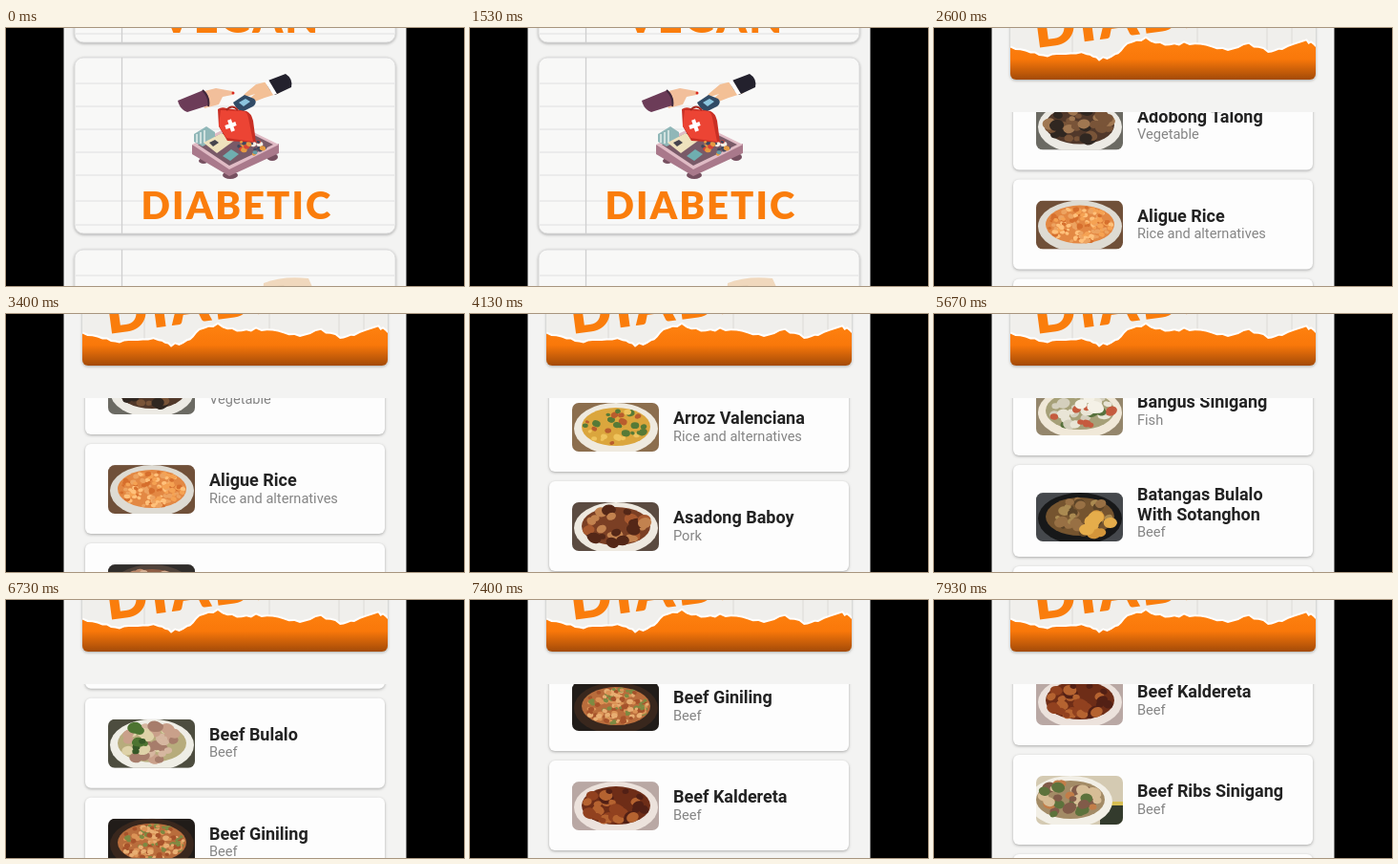
These frames come from a looping animation (480x270 px, 8 s). An HTML page:

```html
<!DOCTYPE html>
<html lang="en">
<head>
<meta charset="utf-8">
<title>Recipe app</title>
<style>
  html, body { margin: 0; width: 100%; height: 100%; overflow: hidden; background: #000; }
  svg { display: block; width: 100vw; height: 100vh; }
  .caps { font: 900 40px Lato, sans-serif; fill: #fa7d0c; letter-spacing: 2.1px; text-anchor: middle; }
  .title { font: 700 18px Roboto, sans-serif; fill: #222; }
  .kind { font: 400 14.6px Roboto, sans-serif; fill: #858585; }
  .card { filter: drop-shadow(0 1.5px 1.5px rgba(0, 0, 0, .3)); }
  #home { animation: home 8s step-end infinite; }
  #recipes { animation: recipes 8s step-end infinite; }
  #categories { animation: browse 8s infinite; }
  #list { animation: swipe 8s cubic-bezier(.35, 0, .3, 1) infinite; }

  @keyframes home { 0% { visibility: visible } 21.625%, 100% { visibility: hidden } }
  @keyframes recipes { 0% { visibility: hidden } 21.625%, 100% { visibility: visible } }
  @keyframes browse {
    0%, 5% { transform: translateY(0); animation-timing-function: ease-in-out }
    9.5% { transform: translateY(-45px); animation-timing-function: ease-in-out }
    15%, 100% { transform: translateY(0) }
  }
  @keyframes swipe {
    0%, 28.375% { transform: translateY(98px) }
    34.125%, 35.875% { transform: translateY(-60px) }
    37.5%, 41.625% { transform: translateY(-65px) }
    51.625%, 52.5% { transform: translateY(-345px) }
    62.5%, 63.375% { transform: translateY(-628px) }
    73.375%, 77.5% { transform: translateY(-922px) }
    86.625%, 88.375% { transform: translateY(-1189px) }
    99.125%, 100% { transform: translateY(-1425px) }
  }
</style>
</head>
<body>
<svg viewBox="0 0 480 270" preserveAspectRatio="none">
  <defs>
    <clipPath id="phone"><path d="M60.500 0h359v270h-359z"/></clipPath>
    <clipPath id="viewport"><path d="M60 88h360v182H60z"/></clipPath>
    <clipPath id="banner"><rect x="80" y="-40" width="320" height="94" rx="6"/></clipPath>
    <clipPath id="thumb"><rect width="91" height="51" rx="7"/></clipPath>
    <linearGradient id="orange" x1="0" y1="0" x2="0" y2="1">
      <stop offset="0" stop-color="#ff8210"/><stop offset=".5" stop-color="#f9780a"/><stop offset="1" stop-color="#a34a08"/>
    </linearGradient>
    <g id="paper">
      <rect class="card" x="72" width="336" height="184" rx="9" fill="#f8f8f7" stroke="#dedede"/>
      <path d="M73 27h334m-334 24h334m-334 24h334m-334 24h334m-334 24h334m-334 27h334m-334 25h334" stroke="#dfdfe0"/>
      <path d="M121.500 0v184" stroke="#cfcfcf" stroke-width="1.300"/>
    </g>
  </defs>

  <g clip-path="url(#phone)">
    <path d="M60 0h360v270H60z" fill="#f3f3f2"/>

    <g id="home"><g id="categories">
      <use href="#paper" y="-169"/>
      <use href="#paper" y="31"/>
      <use href="#paper" y="232"/>
      <text class="caps" x="246" y="5" style="font-size:45px">VEGAN</text>
      <text class="caps" x="242" y="200">DIABETIC</text>

      <!-- finger test -->
      <path d="M204 67l16-4 17 3q4 2 0 4l-10 2-4 8-15 4z" fill="#f2bf9b"/>
      <path d="M180 76l27-11q8 7 5 16l-22 7q-8-3-10-12z" fill="#6c3c58"/>
      <path d="M206 65q8 8 6 17" fill="none" stroke="#40283b" stroke-width="2"/>
      <circle cx="238" cy="68" r="1.500" fill="#d8281e"/>
      <path d="M250 69l12-10 16-4 9 13-16 5-13 5q-5 0-2-5l5-4-9 3q-4 0-2-3z" fill="#f3c096"/>
      <path d="M272 56l21-8q8 5 6 14l-17 8q-6-4-10-14z" fill="#23212d"/>
      <path d="M271 56l4-2 9 15-4 1z" fill="#fff"/>
      <path d="M238 78l12-8 10 4q4 4-1 8l-10 5q-6 1-11-9z" fill="#314b66"/>
      <path d="M244 78l7-4 5 3-7 5z" fill="#8cc5de"/>

      <!-- medical kit -->
      <ellipse cx="207" cy="139" rx="5" ry="3" fill="#765060"/>
      <ellipse cx="235" cy="154" rx="8" ry="4" fill="#765060"/>
      <ellipse cx="279" cy="135" rx="6" ry="4" fill="#765060"/>
      <path d="M195 122v10l39 23 52-24v-10l-40 20z" fill="#a9798b"/>
      <path d="M195 122l46-22 45 22-52 26z" fill="#e0bbc5"/>
      <path d="M201 122l41-19 38 19-46 22z" fill="#795a68"/>
      <path d="M197 111l13-8 9 6v8l-13 7-9-5z" fill="#90b7b8"/>
      <path d="M200 111v9m4-11v12m4-14v13" stroke="#e5f0ec" stroke-width="1.500"/>
      <path d="M207 120l19-10 13 8-18 13z" fill="#eee2bd"/>
      <path d="M213 120l6-3 4 3-6 4z" fill="#46454e"/>
      <path d="M222 85q4-3 9-1l21 3q5 2 7 10l3 23-30-2-9-15z" fill="#c92f24"/>
      <path d="M225 86l24 1q4 1 5 7l5 25-28-4-8-13z" fill="#ec4434"/>
      <path d="M231 86q6-7 12 0" fill="none" stroke="#a82920" stroke-width="2"/>
      <path d="M234 96l4 12m-8-4l11-4" stroke="#fff" stroke-width="4"/>
      <path d="M227 134l9-7 8 5-9 7z" fill="#6faeb0"/>
      <g id="bottles"></g>

      <path d="M270 267q20-8 47-5l4 9-10 42h-45z" fill="#f0d8bd"/>
      <path d="M188 312q45-40 103-43l11 13-42 33z" fill="#ead2b5"/>
    </g></g>

    <g id="recipes">
      <rect class="card" x="80" y="-40" width="320" height="94" rx="6" fill="#a34a08"/>
      <g clip-path="url(#banner)">
        <path d="M80 0h320v54H80z" fill="#f0efec"/>
        <path d="M145 0v30M276 0v25M349 0v28M375 0v20" stroke="#dcdad6"/>
        <text class="caps" style="font-size:58px;text-anchor:start;letter-spacing:3px" transform="translate(107 21) rotate(-7.5)">DIABETIC</text>
        <path id="rim" fill="none" stroke="#fff" stroke-width="4"/>
        <path id="tear" fill="url(#orange)"/>
      </g>
      <g clip-path="url(#viewport)"><g id="list"></g></g>
    </g>
  </g>
</svg>

<script>
(() => {
  const byId = id => document.getElementById(id);

  function randomFrom(seed) {
    return () => (seed = (seed * 16807) % 2147483647) / 2147483647;
  }

  function blobs(count, seed, colors, cx, cy, rx, ry, size) {
    const random = randomFrom(seed * 7919 + 13);
    random();
    return Array.from({ length: count }, () => {
      const angle = random() * Math.PI * 2, reach = Math.sqrt(random());
      const x = (cx + Math.cos(angle) * rx * reach).toFixed(1);
      const y = (cy + Math.sin(angle) * ry * reach).toFixed(1);
      const r = size * (.5 + random() * .7);
      const color = colors[Math.floor(random() * colors.length)];
      const tilt = Math.round(random() * 50 - 25);
      return `<ellipse cx="${x}" cy="${y}" rx="${(r * 1.3).toFixed(1)}" ry="${r.toFixed(1)}" fill="${color}" transform="rotate(${tilt} ${x} ${y})"/>`;
    }).join('');
  }

  // title, kind, backdrop, dish, filling, pieces, piece size
  const recipes = [
    ['Adobong Manok', 'Chicken', '#77614f', '#eee9df', '#704026', '#a86a38 #502c1b #c28b51', 5],
    ['Adobong Talong', 'Vegetable', '#6b6a63', '#eceae4', '#51382a', '#302721 #795438 #a07751', 5],
    ['Aligue Rice', 'Rice and alternatives', '#705039', '#dedbd3', '#e38843', '#f5a253 #d66f2d #ffc17b #eda360', 2.2],
    ['Arroz Caldo', 'Rice and alternatives', '#302d2b', '#50433b', '#8f5d45', '#bd886a #4d332a #d8b296', 4],
    ['Arroz Valenciana', 'Rice and alternatives', '#8c6e4e', '#efeadf', '#dba63d', '#efc45d #b95d2d #567a37', 3],
    ['Asadong Baboy', 'Pork', '#5b4b41', '#eee9e0', '#7b3f24', '#a8592f #542717 #c2824f', 5],
    ['Atcharang Papaya', 'Vegetable', '#8f9b78', '#efeee6', '#dfc77b', '#f0dda0 #dc8440 #799953', 3],
    ['Bagnet With KBL|Sinigang Sa|Sampalok', 'Fish', '#d2cdc4', '#b8aa94', '#85562f', '', 0],
    ['Baked Chicken|Parmesan', 'Chicken', '#d9cfca', '#eee7dc', '#b9823c', '#e2bd67 #8b592f #f1d592', 5],
    ['Bangus Sinigang', 'Fish', '#94866c', '#f0e8d8', '#a6a078', '#e9e5d6 #57713c #c55b3e #d4cfbd', 5],
    ['Batangas Bulalo|With Sotanghon', 'Beef', '#45484c', '#171819', '#75542f', '#987044 #5b4327 #aa8a51', 4],
    ['Beef Adobo', 'Beef', '#54463b', '#eee9e0', '#64351f', '#8c532f #43241a #a5703f', 5],
    ['Beef Bulalo', 'Beef', '#4d4d3f', '#efeee6', '#b7ac7c', '#c9a08a #a77d6b #ded2a8 #d6b7a0', 5],
    ['Beef Giniling', 'Beef', '#211c19', '#39271d', '#b96d3c', '#db9356 #a7532b #e8ae72 #7d8a42', 2.3],
    ['Beef Kaldereta', 'Beef', '#b9a8a4', '#ece2dc', '#6e2d17', '#91411f #522015 #b56330', 5],
    ['Beef Ribs Sinigang', 'Beef', '#d4cab2', '#f2efe6', '#a38b66', '#5d723c #815b49 #d7bd96 #c27d48', 5],
    ['Beef Salpicao', 'Beef', '#4c4037', '#ebe5da', '#633620', '#8b5030 #462719 #b07c4b', 4]
  ];

  const slab = '<path d="M2 9l60-7 18 30-12 17-64-1z" fill="#85562f"/><path d="M62 2l18 30-12 17z" fill="#51361f"/>';
  const cloth = '<path d="M67 28h24v23H67z" fill="#333b2d"/><path d="M74 27h17v4H74z" fill="#d7be53"/>';
  const toppings = {
    'Bangus Sinigang': blobs(5, 13, ['#f4f1e6'], 59, 20, 16, 8, 6),
    'Batangas Bulalo|With Sotanghon': blobs(9, 14, ['#e5ad4b', '#d3953a'], 62, 33, 17, 10, 6),
    'Beef Bulalo': blobs(9, 4, ['#4d7431', '#365827'], 31, 21, 8, 14, 5)
  };

  function thumbnail([title, , backdrop, dish, filling, pieces, size], seed) {
    const besideCloth = title.startsWith('Beef Ribs');
    const plate = `<ellipse cx="46" cy="27" rx="44" ry="27" fill="${dish}"/>
      <ellipse cx="46" cy="25" rx="36" ry="20" fill="${filling}"/>` +
      blobs(size < 3 ? 140 : 36, seed, pieces.split(' '), 46, 25, 33, 18, size) + (toppings[title] || '');
    return `<rect width="91" height="51" fill="${backdrop}"/>${besideCloth ? cloth : ''}
      <g transform="translate(${besideCloth ? -10 : 0})">${size ? plate : slab}</g>`;
  }

  let y = 0;
  byId('list').innerHTML = recipes.map((recipe, index) => {
    const lines = recipe[0].split('|');
    const extra = lines.length - 1;
    const height = [94, 96, 117][extra];
    const baseline = [44, 36.5, 37.5][extra];
    const titles = lines.map((line, i) => `<text class="title" x="213" y="${baseline + i * 21}">${line}</text>`).join('');
    const html = `<g transform="translate(0 ${y})">
      <rect class="card" x="83" width="314" height="${height}" rx="6" fill="#fdfdfd"/>
      <g transform="translate(107 ${[22, 29, 30][extra]})" clip-path="url(#thumb)">${thumbnail(recipe, index + 1)}</g>
      ${titles}<text class="kind" x="213" y="${baseline + extra * 21 + 17.5}">${recipe[1]}</text></g>`;
    y += height + 10;
    return html;
  }).join('');

  // Torn edge: a few ridge points roughened with small jitter
  const ridge = [[80, 22], [101, 27], [119, 29], [138, 27], [160, 28], [173, 34], [190, 29], [203, 18], [222, 11],
    [242, 19], [262, 17], [285, 19], [308, 23], [330, 18], [350, 25], [365, 22], [390, 14], [400, 20]];
  const jitter = randomFrom(421);
  const edge = ridge.slice(1).flatMap(([x1, y1], i) => {
    const [x0, y0] = ridge[i];
    return [0, .25, .5, .75].map(t =>
      `${(x0 + (x1 - x0) * t).toFixed(1)} ${(y0 + (y1 - y0) * t + jitter() * 3 - 1.5).toFixed(1)}`);
  }).join('L') + 'L400 20';
  byId('tear').setAttribute('d', `M${edge}V54H80z`);
  byId('rim').setAttribute('d', `M${edge}`);

  byId('bottles').innerHTML = blobs(22, 9, ['#d64335', '#f4eee5', '#629ca5', '#e59a42', '#41475d'], 257, 125, 15, 8, 2.2);
})();
</script>
</body>
</html>
```
